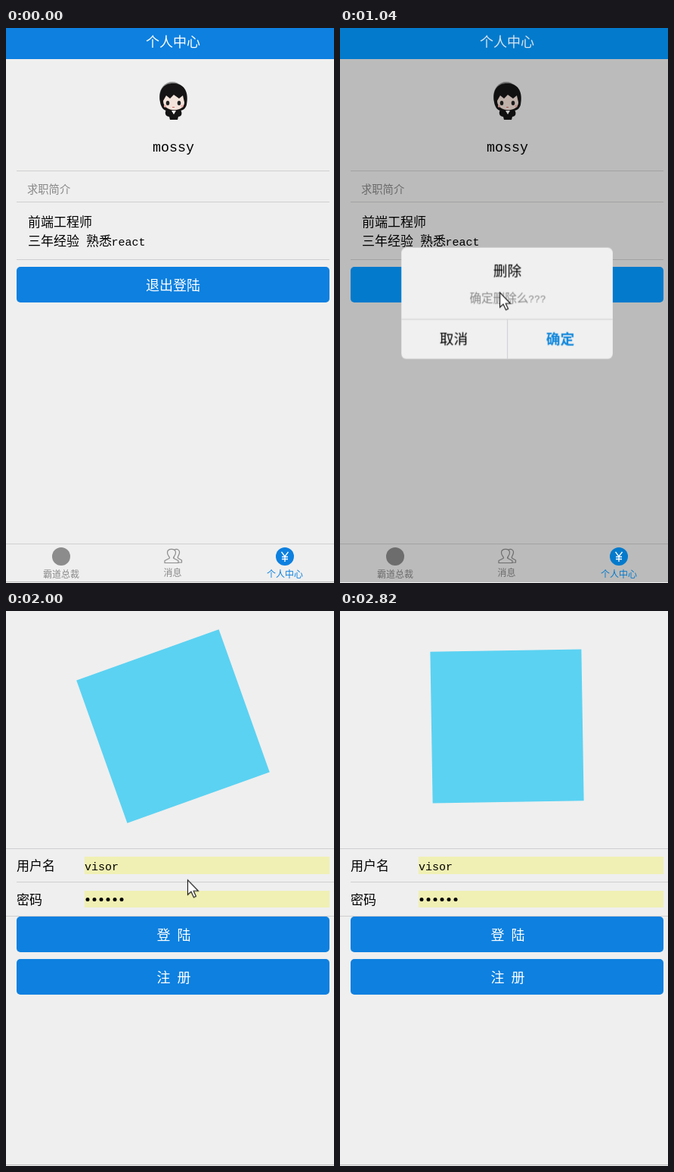
These frames come from a looping animation (434x732 px, 2.84 s). An HTML page:

```html
<!DOCTYPE html>
<html lang="zh-CN">
<head>
<meta charset="utf-8">
<title>个人中心</title>
<style>
html, body { margin: 0; width: 100%; height: 100%; overflow: hidden; background: #efefef; }
svg { display: block; width: 434px; height: 732px; }
text { font-family: "Noto Sans CJK SC", "Noto Sans CJK", sans-serif; font-weight: 300; font-size: 18px; fill: #000; }
.mid { text-anchor: middle; }
.mono { font-family: "Liberation Mono", monospace; font-weight: 400; font-size: 15px; }
.body { font-size: 17px; }
.small { font-size: 12px; font-weight: 400; }
.gray { fill: #888; }
.white { fill: #fff; }
.wide { word-spacing: 5px; }
.rule { stroke: #cfcfd1; fill: none; }
.field { fill: #f0f0b4; }
.button { fill: #0d80e0; }

/* one 2840 ms loop shared by every part */
.blue, .pale, .tint, .login, .mask, .modal, .press, .active, .cursor, .arrow, .beam, .spin {
  animation: 2840ms linear infinite;
}
.tint { animation-name: leave; }
.blue { fill: #0d80e0; animation-name: blue; }
.pale { fill: #fff; animation-name: pale; }
.press { fill: #0b76cd; animation-name: press; }
.login { animation-name: enter; }
.mask { animation-name: mask; }
.modal { transform-origin: 221px 363px; animation-name: modal; }
.active { fill: #d0d0d0; animation-name: active; }
.cursor { animation-name: travel; }
.arrow { animation-name: arrow; }
.beam { animation-name: beam; }
.spin { transform-origin: 221px 152px; animation-name: spin; }

@keyframes spin { from { transform: rotate(-65.3deg); } to { transform: rotate(-.5deg); } }
@keyframes leave { 0%, 64.07% { opacity: 1; } 64.08%, 100% { opacity: 0; } }
@keyframes enter { 0%, 64.07% { opacity: 0; } 64.08%, 100% { opacity: 1; } }
@keyframes press {
  0%, 28.86% { opacity: 0; }
  28.87%, 32.38% { opacity: 1; }
  32.39%, 100% { opacity: 0; }
}
@keyframes blue {
  0%, 32.39% { fill: #0d80e0; }
  38.03%, 100% { fill: #0078c6; }
}
@keyframes pale {
  0%, 32.39% { fill: #fff; }
  38.03%, 100% { fill: #c9dbe8; }
}
@keyframes mask {
  0% { opacity: 0; }
  32.39% { opacity: 0; animation-timing-function: cubic-bezier(.55, 0, .55, .2); }
  38.03%, 64.08% { opacity: .4; }
  69.01%, 100% { opacity: 0; }
}
@keyframes modal {
  0%, 32.39% { opacity: 0; transform: scale(1.15); }
  34.15% { opacity: 1; transform: scale(1.103); }
  38.03%, 64.08% { opacity: 1; transform: none; }
  69.01%, 100% { opacity: 0; transform: none; }
}
@keyframes active {
  0%, 59.85% { opacity: 0; }
  59.86%, 100% { opacity: 1; }
}
@keyframes arrow {
  0%, 51.4% { opacity: 1; }
  51.41%, 63.37% { opacity: 0; }
  63.38%, 100% { opacity: 1; }
}
@keyframes beam {
  0%, 51.4% { opacity: 0; }
  51.41%, 63.37% { opacity: 1; }
  63.38%, 100% { opacity: 0; }
}
@keyframes travel {
  0%, 11.97% { transform: translate(300px, -30px); animation-timing-function: ease-in-out; }
  28.17%, 35.21% { transform: translate(196px, 339px); }
  41.55% { transform: translate(262px, 380px); animation-timing-function: ease-out; }
  50.7%, 63.38% { transform: translate(288px, 402px); }
  70.42% { transform: translate(240px, 354px); }
  78.87% { transform: translate(226px, 400px); animation-timing-function: ease-in; }
  85.92% { transform: translate(186px, 11px); }
  89.44%, 100% { transform: translate(46px, -30px); }
}
</style>
</head>
<body>
<svg viewBox="0 0 434 732">
  <defs>
    <clipPath id="card"><rect x="86" y="292" width="270" height="142" rx="7"/></clipPath>
  </defs>
  <rect width="434" height="732" fill="#efefef"/>

  <g id="profile">
    <g id="avatar">
      <path d="M212 108C209 113 212 117 216 117L217 121H227L228 117C232 117 234 113 231 108Z" fill="#151515"/>
      <path d="M219 109L222 114L225 109Z" fill="#fff"/>
      <ellipse cx="220" cy="90" rx="17" ry="19" fill="#8d8d8d"/>
      <path d="M204 98C201 80 210 72 223 73C237 74 242 86 239 101C238 106 234 109 230 109H212C208 108 205 104 204 98Z" fill="#161414"/>
      <path d="M208 96L212 89L217 93L222 88L229 93L234 89L236 98C236 112 208 112 208 96Z" fill="#f4e3da"/>
      <ellipse cx="214" cy="99" rx="2.3" ry="3" fill="#222"/>
      <ellipse cx="229" cy="99" rx="2.3" ry="3" fill="#222"/>
      <circle cx="210.500" cy="103" r="1.700" fill="#f0b3ad"/>
      <circle cx="233" cy="103" r="1.700" fill="#f0b3ad"/>
      <path d="M220 104.500H223" stroke="#c66"/>
    </g>
    <text class="mono mid" x="221.500" y="163" style="font-size:18.300px">mossy</text>
    <path class="rule" d="M14 188.500H428M14 229.500H428M14 305.500H428M0 680.500H434"/>
    <text class="gray" x="28" y="217.500" style="font-size:14.300px">求职简介</text>
    <text class="body" x="29" y="262">前端工程师</text>
    <text class="body" x="29" y="287">三年经验</text>
    <text class="body" x="106" y="287">熟悉</text>
    <text class="mono" x="139.500" y="287">react</text>
    <circle cx="73" cy="697" r="12" fill="#8c8c8c"/>
    <text class="small mid gray" x="73" y="725">霸道总裁</text>
    <g fill="#efefef" stroke="#8c8c8c" stroke-width="1.200" stroke-linejoin="round">
      <path d="M222 689C226 685 231 689 229 694C228 697 226 698 228 699.500L232.500 702V705H222Z"/>
      <path d="M210 705.500V702.500L216 699.500C218 698 213 696 213.500 691.500C214 686 224 686 224.500 691.500C225 696 220 698 222 699.500L228 702.500V705.500Z"/>
    </g>
    <text class="small mid gray" x="220.500" y="723">消息</text>
  </g>

  <g class="login">
    <rect width="434" height="732" fill="#efefef"/>
    <rect class="spin" x="121" y="52" width="200" height="200" fill="#5bd2f2"/>
    <path class="rule" d="M0 313.500H434M14 357.500H434M0 402.500H434"/>
    <text class="body" x="14" y="342">用户名</text>
    <text class="body" x="14" y="387">密码</text>
    <rect class="field" x="104" y="324" width="324" height="23"/>
    <rect class="field" x="104" y="369" width="324" height="22"/>
    <text class="mono" x="104" y="342">visor</text>
    <path d="M108 380.500H154" stroke="#000" stroke-width="5" stroke-linecap="round" stroke-dasharray="0 9"/>
    <rect class="button" x="14" y="403" width="414" height="47" rx="5"/>
    <rect class="button" x="14" y="459" width="414" height="47" rx="5"/>
    <text class="mid white wide" x="222" y="433.500">登 陆</text>
    <text class="mid white wide" x="222" y="489.500">注 册</text>
  </g>

  <path d="M0 730.500H434" stroke="#bcbcbc"/>
  <rect class="mask" width="434" height="730"/>

  <g class="tint">
    <rect class="blue" width="434" height="41"/>
    <text class="mid pale" x="221" y="25">个人中心</text>
    <rect class="blue" x="14" y="315" width="414" height="47" rx="5"/>
    <rect class="press" x="14" y="315" width="414" height="47" rx="5"/>
    <text class="mid pale" x="221" y="345.500">退出登陆</text>
    <circle class="blue" cx="369" cy="697" r="12"/>
    <path d="M364.500 691L369 697L373.500 691M369 697V704M365 697.500H373M365 700.500H373" fill="none" stroke="#fff" stroke-width="1.300"/>
    <text class="small mid blue" x="369" y="725">个人中心</text>
  </g>

  <g class="modal">
    <g clip-path="url(#card)">
      <rect x="86" y="292" width="270" height="142" fill="#f0f0f0"/>
      <rect class="active" x="221" y="383" width="135" height="51"/>
    </g>
    <path class="rule" d="M86 383.500H356M221.500 383V434"/>
    <text class="mid" x="221.500" y="328">删除</text>
    <text class="gray mid" x="222" y="362" style="font-size:15px">确定删除么<tspan class="mono" style="font-size:12.500px">???</tspan></text>
    <text class="mid" x="153" y="415.500">取消</text>
    <text class="mid" x="289" y="415.500" style="fill:#0d86dc;font-weight:700">确定</text>
  </g>

  <path class="beam" d="M288 411.500H291L292 412.500L293 411.500H296M292 412V430M288 430.500H291L292 429.500L293 430.500H296" fill="none" stroke="#222" stroke-width="1.300"/>
  <g class="cursor">
    <path class="arrow" d="M.5 .5V20L5 16L8.500 23.500L11.500 22L8.200 15H14.500Z" fill="#fff" stroke="#111" stroke-width="1.100"/>
  </g>
</svg>
</body>
</html>
```
